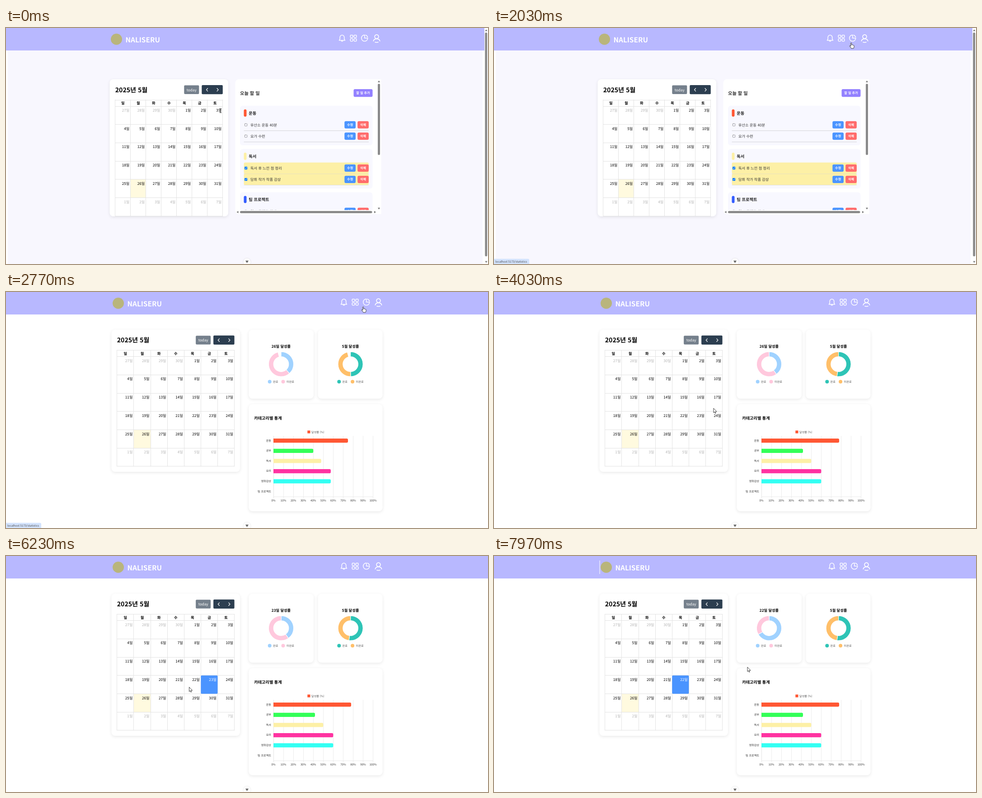
These frames come from a looping animation (1067 by 525 pixels, 8 s). An HTML page with a canvas:

```html
<!DOCTYPE html>
<html lang="ko">
<head>
<meta charset="utf-8">
<title>Planner</title>
<style>
  html, body { margin: 0; width: 100%; height: 100%; overflow: hidden; background: #fff; }
  canvas { display: block; }
</style>
</head>
<body>
<canvas id="stage" width="1067" height="525"></canvas>
<script>
const ctx = document.getElementById('stage').getContext('2d');
const FONT = '"Noto Sans CJK KR", "Noto Sans CJK JP", "Noto Sans", sans-serif';
const LOOP = 8000, OPEN_STATS = 2170, PICK_23 = 4690, PICK_22 = 6770;
const RED = '#ff5733', CREAM = '#fdf0a6', BLUE = '#4a94ff', GREY = '#8b8b8b', LAVENDER = '#f8f8ff';

const clamp = v => Math.max(0, Math.min(1, v));
const easeOut = p => 1 - (1 - clamp(p)) ** 4;

// Text is centred vertically on y.
function text(str, x, y, size, color = '#000', weight = 400, align = 'left') {
  ctx.font = `${weight} ${size}px ${FONT}`;
  ctx.textAlign = align;
  ctx.fillStyle = color;
  ctx.fillText(str, x, y + size * 0.37);
}

function box(x, y, w, h, color, radius = 0) {
  ctx.fillStyle = color;
  ctx.beginPath();
  ctx.roundRect(x, y, w, h, radius);
  ctx.fill();
}

function card(x, y, w, h) {
  ctx.save();
  ctx.shadowColor = 'rgba(0,0,0,.09)';
  ctx.shadowBlur = 7;
  ctx.shadowOffsetY = 2;
  box(x, y, w, h, '#fff', 8);
  ctx.restore();
}

function disc(x, y, r, color) {
  ctx.fillStyle = color;
  ctx.beginPath();
  ctx.arc(x, y, r, 0, 7);
  ctx.fill();
}

function stroke(path, color, width) {
  ctx.strokeStyle = color;
  ctx.lineWidth = width;
  ctx.stroke(new Path2D(path));
}

function triangle(x, y, dx, dy, size, color = '#777') {
  ctx.fillStyle = color;
  ctx.beginPath();
  ctx.moveTo(x + dx * size, y + dy * size);
  ctx.lineTo(x - dx * size + dy * size * 1.25, y - dy * size + dx * size * 1.25);
  ctx.lineTo(x - dx * size - dy * size * 1.25, y - dy * size - dx * size * 1.25);
  ctx.fill();
}

function header(shift, width) {
  box(0, 0, width, 50, '#b8b8ff');
  ctx.save();
  ctx.translate(shift, 0);
  disc(244.5, 25, 12.5, '#b9b57c');
  text('NALISERU', 264.5, 26, 15.4, '#fff', 700);
  ctx.lineCap = ctx.lineJoin = 'round';
  stroke('M737.5 27.5h13l-1.7-2.6v-4.2a4.8 5 0 0 0-9.6 0v4.2zM742.3 28.8q1.7 1.8 3.4 0', '#fff', 1.5);
  for (const x of [762.2, 770.3]) for (const y of [15.7, 23.8]) {
    ctx.beginPath();
    ctx.roundRect(x, y, 5.6, 5.6, 1.6);
    ctx.stroke();
  }
  stroke('M793.8 15.5a7 7 0 1 0 7 7h-7zM796 15.8a7 7 0 0 1 4.6 4.6', '#fff', 1.5);
  stroke('M824.9 19.2a4.4 4.4 0 1 1-8.8 0a4.4 4.4 0 1 1 8.8 0M813.3 29q1.2-4.8 7.2-4.8t7.2 4.8M817 31.5q3.5 1 7 0', '#fff', 1.7);
  ctx.restore();
}

function calendar(x, y, w, h, selected) {
  card(x, y, w, h);
  const pad = 12.3, left = x + pad, width = w - pad * 2, right = left + width, top = y + 45.7;
  const col = width / 7, row = 40.7, first = top + 14.3;
  text('2025년 5월', left, y + 23.5, 14.1, '#000', 700);
  box(right - 85.5, y + 13.5, 33, 19.5, '#75808c', 2);
  text('today', right - 69, y + 23.5, 8.2, '#fff', 400, 'center');
  box(right - 46.5, y + 13, 46.5, 20.2, '#2c3e50', 2);
  ctx.lineCap = ctx.lineJoin = 'round';
  stroke(`M${right - 33.3} ${y + 20.2}l-3 3.2l3 3.2M${right - 12.7} ${y + 20.2}l3 3.2l-3 3.2`, '#fff', 1.3);

  box(left + col, first + row * 4, col, row, '#fffadf');
  let grid = `M${left} ${Math.round(top) + .5}h${width}`;
  for (let r = 0; r < 7; r++) grid += `M${left} ${Math.round(first + r * row - .5) + .5}h${width}`;
  for (let c = 0; c < 8; c++) grid += `M${Math.floor(left + c * col) + .5} ${top}v${14.3 + row * 6}`;
  stroke(grid, '#e0e0e0', 0.9);

  [...'일월화수목금토'].forEach((d, c) => text(d, left + (c + .5) * col, top + 7.5, 8.2, '#000', 700, 'center'));
  for (let i = 0; i < 42; i++) {
    const day = i < 4 ? 27 + i : (i - 4) % 31 + 1;
    const inMonth = i > 3 && i < 35, picked = inMonth && day === selected;
    const cx = left + i % 7 * col, cy = first + Math.floor(i / 7) * row;
    if (picked) box(cx, cy, col, row, BLUE, 2);
    text(day + '일', cx + col - 2.5, cy + 9, 8.2,
      picked ? '#fff' : inMonth ? '#000' : 'rgba(0,0,0,.3)', 400, 'right');
  }
}

function button(label, x, y, w, h, color) {
  box(x, y, w, h, color, 3);
  text(label, x + w / 2, y + h / 2, 7.15, '#fff', 700, 'center');
}

function todoItem(label, y, done) {
  if (done) box(526.5, y - 12.4, 276.5, 24.8, CREAM, 3);
  box(526.5, y + 12.5, 276.5, .7, '#c9c9c9');
  if (done) {
    box(528, y - 3.2, 6.2, 6.2, '#0075ff', 1);
    stroke(`M529.4 ${y}l1.3 1.4l2.2-2.9`, '#fff', 0.9);
  } else {
    ctx.strokeStyle = '#767676';
    ctx.lineWidth = 0.7;
    ctx.beginPath();
    ctx.roundRect(528.4, y - 2.8, 5.4, 5.4, 1);
    ctx.stroke();
  }
  text(label, 541, y + .3, 8.22, '#333');
  button('수정', 749.3, y - 8.2, 24.7, 16.2, BLUE);
  button('삭제', 778.2, y - 8.2, 24.7, 16.2, '#ff6b6b');
}

const todos = [
  ['운동', RED, false, '유산소 운동 40분', '요가 수련'],
  ['독서', CREAM, true, '독서 후 느낀 점 정리', '담휘 작가 작품 감상'],
  ['팀 프로젝트', '#335cff', false, '팀 프로젝트 회의']
];

function homePage() {
  box(4, 50, 1051, 475, '#f8f7fe');
  header(0, 1059);
  box(1060.3, 10, 5, 498, GREY, 2.5);
  triangle(1063, 5, 0, -1, 2);
  triangle(1063, 520.5, 0, 1, 2);
  calendar(229.5, 114, 262.6, 305);

  box(507.5, 114, 323, 300, '#fff', [8, 0, 0, 8]);
  text('오늘 할 일', 518, 145.3, 10.3, '#333', 700);
  button('할 일 추가', 769.5, 136, 42, 17.3, '#9381ff');
  ctx.save();
  ctx.beginPath();
  ctx.rect(507, 114, 314, 291);
  ctx.clip();
  todos.forEach(([name, color, done, ...items], i) => {
    const y = 173 + i * 96.2;
    box(518, y, 293.5, 88, LAVENDER, 6);
    box(526.5, y + 8, 6, 16.2, color, 3);
    text(name, 537.3, y + 16.3, 9.25, '#222', 700);
    items.forEach((item, k) => todoItem(item, y + 42.5 + k * 25.2, done));
  });
  ctx.restore();
  box(823, 124, 5, 158.5, GREY, 2.5);
  triangle(825.5, 118.8, 0, -1, 2);
  triangle(825.5, 401.8, 0, 1, 2);
  box(518, 407, 292.5, 5, GREY, 2.5);
  triangle(512.5, 409.5, -1, 0, 2);
  triangle(817, 409.5, 1, 0, 2);
}

function donut(cx, title, share, colors, progress) {
  const cy = 160.5, turn = Math.PI * 2, start = -turn / 4;
  text(title, cx, 121, 8.25, '#000', 700, 'center');
  let from = start;
  [share, 1 - share].forEach((part, i) => {
    const to = from + turn * part * progress;
    ctx.beginPath();
    ctx.arc(cx, cy, 27.6, from, to);
    ctx.arc(cx, cy, 16.8, to, from, true);
    ctx.closePath();
    ctx.fillStyle = colors[i];
    ctx.fill();
    ctx.strokeStyle = '#fff';
    ctx.lineWidth = 1.1;
    ctx.stroke();
    from = to;
  });
  ['완료', '미완료'].forEach((label, i) => {
    disc(cx - 25.3 + i * 29.8, 199.6, 4, colors[i]);
    text(label, cx - 18 + i * 30, 199.6, 6.15, '#555');
  });
}

const categories = [
  ['운동', RED, 78], ['공부', '#33ff57', 41.7], ['독서', CREAM, 50],
  ['요리', '#ff33a1', 60], ['영화감상', '#33fff3', 60], ['팀 프로젝트', BLUE, 0]
];

function barChart(progress) {
  const x0 = 592, step = 22.06;
  text('카테고리별 통계', 549.3, 280.7, 9.15, '#000', 700);
  box(667.3, 308.2, 6.2, 6.2, RED);
  text('달성률 (%)', 676, 311.3, 6.15, '#555');
  for (let i = 0; i <= 10; i++) {
    const x = x0 + i * step;
    box(Math.floor(x), 320, .8, 138.5, i ? '#e8e8e8' : '#dcdcdc');
    text(i * 10 + '%', x, 464, 6.15, '#333', 400, 'center');
  }
  box(x0, 455, step * 10, .8, '#e5e5e5');
  categories.forEach(([name, color, value], i) => {
    const y = 330.7 + i * 22.63;
    text(name, 587, y - .4, 6.15, '#333', 400, 'right');
    if (value) box(x0, y - 4.6, value / 10 * step * progress, 9.2, color, [0, 2.8, 2.8, 0]);
  });
}

function statsPage(t) {
  header(4, 1067);
  const selected = t >= PICK_22 ? 22 : t >= PICK_23 ? 23 : 0;
  const clicked = selected === 22 ? PICK_22 : selected ? PICK_23 : OPEN_STATS;
  const opening = easeOut((t - OPEN_STATS - 50) / 1000);
  const dayProgress = selected ? easeOut((t - clicked) / 1000) : opening;

  // Blinking text caret, restarted by every click
  if (Math.floor((t - clicked) / 500) % 2 === 0) box(233.5, 10, 1, 30, '#fff');

  calendar(233.5, 83.7, 284.4, 316.3, selected);
  card(537.5, 84, 143.5, 153.3);
  card(690.5, 84, 143, 153.3);
  card(537.5, 249.5, 296, 238.3);
  donut(609, `${selected || 26}일 달성률`, selected === 22 ? 2 / 3 : 0.4, ['#a0d2ff', '#ffc8dd'], dayProgress);
  donut(762.6, '5월 달성률', 0.52, ['#2ec4b6', '#ffbf69'], opening);
  barChart(opening);
}

function statusBar(t) {
  const alpha = Math.min(clamp((t - 1600) / 100), clamp((3920 - t) / 220));
  if (!alpha) return;
  ctx.globalAlpha = alpha;
  box(0, 513.4, 78, 12, '#d3e3fd', [0, 3, 0, 0]);
  text('localhost:5173/statistics', 3, 519.4, 6.25, '#474747');
  ctx.globalAlpha = 1;
}

function scrollHint() {
  ctx.save();
  ctx.shadowColor = 'rgba(0,0,0,.13)';
  ctx.shadowBlur = 3;
  disc(533.5, 520.3, 8, '#fff');
  ctx.restore();
  triangle(533.5, 520.3, 0, 1, 2.8, '#666');
}

// Pointer stops: time, x, y
const stops = [
  [0, 475, 184], [470, 475, 184], [1300, 782, 45], [1430, 789.5, 32.5], [3000, 789.5, 32.5],
  [3830, 537, 236], [4030, 486, 259], [4300, 461, 279], [4540, 461, 279], [4700, 457.5, 281.5],
  [5380, 457.5, 281.5], [5770, 434, 286], [5930, 434, 286], [6230, 405.5, 292],
  [7720, 405.5, 292], [7970, 561, 247.5], [8000, 561, 247.5]
];

function pointer(t) {
  const i = stops.findIndex(s => s[0] > t);
  const [t0, x0, y0] = stops[i - 1], [t1, x1, y1] = stops[i];
  const p = (t - t0) / (t1 - t0), e = p * p * (3 - 2 * p);
  ctx.save();
  ctx.translate(x0 + (x1 - x0) * e, y0 + (y1 - y0) * e);
  ctx.lineJoin = 'round';
  if (t < 500) {
    stroke('M-1.8-4.5h1.2l.6.6l.6-.6h1.2M0-4v8M-1.8 4.5h1.2l.6-.6l.6.6h1.2', '#222', 0.9);
  } else {
    const hand = t > 1350 && t < 3080;
    const shape = hand
      ? 'M.2.8q1-1.2 1.9 0v4.2l1.3-.3q1 0 1.2.7q1-.4 1.5.5q1.4-.1 1.4 1.1v3q-.2 1.6-1.1 2.8h-5q-1.4-2.3-3.5-4.6q-.6-1.4.8-1.5l1.5 1.2z'
      : 'M0 0v9.6l2.2-2l1.5 3.4l1.5-.7l-1.5-3.2h3z';
    ctx.fillStyle = '#fff';
    ctx.fill(new Path2D(shape));
    stroke(shape, '#111', 0.8);
  }
  ctx.restore();
}

function draw(now) {
  const t = now % LOOP;
  ctx.textRendering = 'geometricPrecision';
  box(0, 0, 1067, 525, '#fff');
  if (t < OPEN_STATS) homePage(); else statsPage(t);
  scrollHint();
  statusBar(t);
  pointer(t);
}

let origin;
function tick(now) {
  origin ??= now;
  draw(now - origin);
  requestAnimationFrame(tick);
}
requestAnimationFrame(tick);
</script>
</body>
</html>
```
